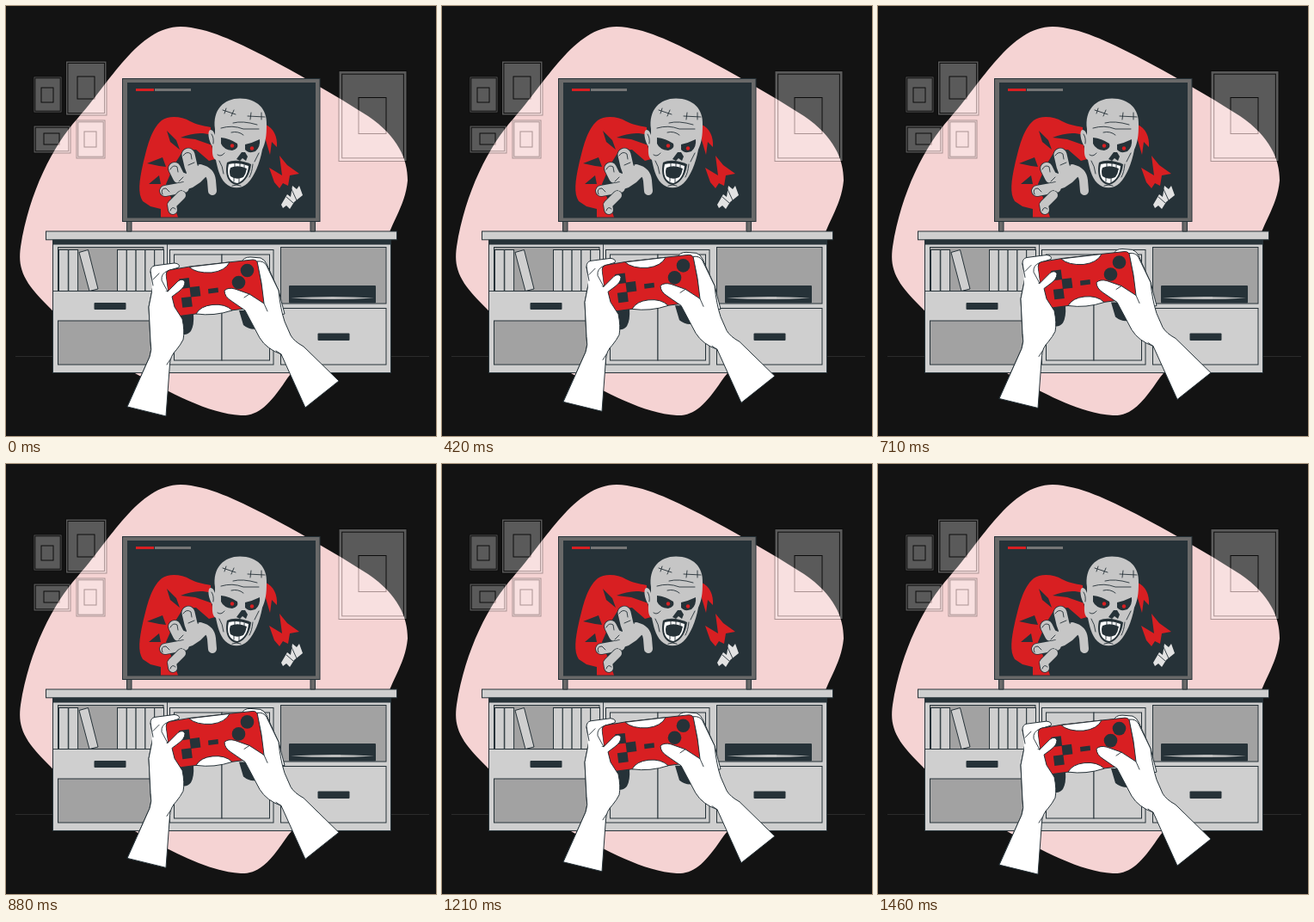
An HTML page that plays this animation: 500x500 px, repeating every 1500 ms.

```html
<!DOCTYPE html>
<html lang="en">
<head>
<meta charset="utf-8">
<title>Game night</title>
<style>
  html, body { margin: 0; width: 100%; height: 100%; overflow: hidden; background: #131313; }
  svg { display: block; width: 100vw; height: 100vh; }
  .ink { fill: #263238; }
  .red { fill: #d81f22; }
  .skin { fill: #c6c6c6; }
  .line { fill: none; stroke: #263238; stroke-width: .9; stroke-linecap: round; stroke-linejoin: round; }
  .wood { fill: #cfcfcf; stroke: #263238; }
  .hole { fill: #a2a2a2; stroke: #263238; }
  .hand { fill: #fff; stroke: #263238; stroke-linejoin: round; }
  .pic { fill: #fff; stroke: #000; stroke-width: 1; }
</style>
</head>
<body>
<svg viewBox="0 0 500 500">
  <rect width="500" height="500" fill="#131313"/>
  <path fill="#f5d3d3" d="M203 24C235 25 268 42 300 58C338 78 382 103 421 128C456 152 467 178 467 203C464 235 447 250 435 295C400 380 352 398 325 436C306 464 293 477 273 476C235 474 190 449 150 427C110 410 75 376 45 345C18 318 14 302 17 280C27 216 55 162 83 131C120 90 154 24 203 24Z"/>
  <path d="M11 407.500H54M447 407.500H492" stroke="#2c2c2c"/>
  <g id="pics" opacity=".3"></g>

  <g id="cabinet">
    <rect class="wood" x="54.500" y="277" width="393" height="149.500"/>
    <rect class="ink" x="54" y="271" width="394" height="6"/>
    <rect class="wood" x="46.500" y="262" width="408" height="9.800"/>
    <rect class="hole" x="60.500" y="280.500" width="122.500" height="51"/>
    <rect class="hole" x="60.500" y="366" width="122.500" height="51"/>
    <path class="line" d="M54.500 331.500H187M187.500 277V417"/>
    <rect class="ink" x="102.500" y="345" width="37" height="8" rx="1"/>
    <rect class="wood" x="190.500" y="283.500" width="120.500" height="133.500"/>
    <rect class="wood" x="195.500" y="289" width="55.500" height="123"/>
    <rect class="wood" x="251" y="289" width="55.500" height="123"/>
    <rect class="hole" x="319.500" y="280.500" width="122.500" height="65.500"/>
    <rect class="ink" x="329" y="325" width="101" height="20.500" rx="1"/>
    <path fill="#bdbdbd" d="M331 339.500Q380 336.500 428 339.500Q380 342.500 331 339.500Z"/>
    <rect class="wood" x="319.500" y="351.500" width="122.500" height="65.500"/>
    <rect class="ink" x="362.500" y="380.500" width="37" height="8.500" rx="1"/>
    <g id="books"></g>
    <path class="wood" d="M85 286.500L95.500 283.500L107 329L97 331.500Z"/>
  </g>

  <g id="tv">
    <path fill="#696969" stroke="#263238" d="M140.500 250H146V262H140.500ZM354 250H359.500V262H354Z"/>
    <rect x="135.500" y="84.500" width="229.500" height="166" fill="#696969" stroke="#263238"/>
    <rect class="ink" x="141" y="89" width="219" height="157.500"/>
    <path d="M173 97.500H215" stroke="#757575" stroke-width="3"/>
    <path d="M151 97.500H172" stroke="#d81f22" stroke-width="3"/>
  </g>

  <g id="monster">
    <path class="red" d="M238 141C229 139 221 138 214 134C204 128 189 127 181 133C168 144 164 165 159 185C155 203 153 218 159 227L168 233L180 236V245.500H200L193 226L186 207L196 184L206 168L221 167L236 180L243 178L238 158Z"/>
    <path class="ink" d="M238 150C226 146 214 149 203 153L220 155L240 162ZM187 145L191 158L202 167L198 156ZM182 176L164 183L178 186L186 187ZM178 197L166 207L180 207Z"/>
    <path class="red" d="M302 138C311 142 316 152 315 164L309 158L307 173L302 156ZM318 174L327 185L341 195L330 197L328 209L322 206L318 212L312 205L306 188L321 197Z"/>
    <path fill="#e2e2e2" d="M320 231L327 219L331 222L333 209L338 213L341 209L345 220L335 228L330 236L326 232L322 235Z"/>
    <path class="line" d="M326 222L334 229M332 213L338 226"/>
    <g id="claw"></g>

    <path class="skin" d="M243 143C240 121 253 107.500 272 107.500C292 107.500 304 120 303 138C303 151 302 158 298 167C295 183 289 198 281 206C274 213 262 213 255 206C248 199 246 188 244 179C239 176 240 168 240 163C235 156 234 144 238 144Q241 144 243 150Z"/>
    <path class="line" d="M252 121L267 126M256 119L254 125M265 121L262 128M281 128L301 129M285 124L284 132M297 124L297 132M264 136Q275 133 292 138M250 142Q263 138 276 143L294 143M262 147Q270 145 276 150M239 149Q242 153 241 160M246 173Q250 176 254 171M294 171L289 181M248 180Q252 186 253 195M287 184Q286 194 283 199M263 209Q268 207 273 209"/>
    <path class="ink" d="M250 153Q260 154 269 160Q271 166 263 168Q253 167 250 160ZM278 161Q287 159 295 155Q296 164 290 169Q282 172 278 167ZM274 170L268 178L272 180L275 177L279 180L281 175L278 170Z"/>
    <circle class="red" cx="263" cy="162.500" r="2.200"/>
    <circle class="red" cx="286" cy="165.500" r="2.200"/>
    <path class="ink" d="M257 182C265 178 276 180 285 184C284 194 279 205 269 208C258 207 254 196 257 182Z"/>
    <path fill="#fff" d="M259 184Q270 181 282 186C281 196 277 203 269 206C260 205 256 196 259 184Z"/>
    <path class="ink" d="M261 188Q270 184 280 189Q279 195 276 199Q268 203 261 198Q259 193 261 188Z"/>
    <path class="line" d="M266 183V187M272 183V188M277 185V188M265 200V204M271 200V205"/>
  </g>

  <g id="player">
    <path class="ink" d="M203 360L218 358Q219 371 215 378Q210 384 203 381ZM271 354H298L300 372Q287 380 276 371Z"/>
    <path class="hand" d="M274 298Q276 292 284 292L296 293Q301 295 303 300L317 331L324 358L306 362L290 330Z"/>
    <path class="hand" d="M141 466L167 408Q170 400 168 390L166 350L171 325L168 309Q168 303 173 302L196 299Q203 300 201 304L188 308L194 350Z"/>
    <path class="red" stroke="#263238" d="M190 307L214 303L259 298L287 295Q292 295 293 300L300 340Q300 349 293 350L262 354L221 358L198 361Q192 361 191 354L186 313Q186 308 190 307Z"/>
    <path fill="#fff" stroke="#263238" d="M213 303.500L260 298Q255 308 239 310Q221 311 213 303.500ZM221 358Q226 349 240 347.500Q255 346 263 354Q242 361 221 358Z"/>
    <g class="ink">
      <circle cx="280.500" cy="307.500" r="7.800"/>
      <circle cx="270.500" cy="321.500" r="7.800"/>
      <path d="M235 329L246.500 327.500L247 333L235.500 334.500Z"/>
      <g id="pad" transform="translate(209 333.500) rotate(-7)"></g>
    </g>
    <path class="hand" d="M141 466L167 408Q170 400 168 390L166 350L171 325L188 332L200 320Q206 316 208 321Q208 327 201 332L193 338L196 350L205 364Q208 378 206 388Q203 394 198 400Q191 407 190.500 416L186 477Z"/>
    <path fill="#fff" d="M169 310L185.500 312L188 331L170 335Z"/>
    <path class="line" d="M168 309L171 325M188 308Q180 311 181 319L188 332M171 318L178 311M191 411L187 417"/>
    <path class="hand" d="M292 297Q300 296 303 302L317 331Q319 352 324 367L331 383Q335 390 346 396L387 436L348 467L320 405Q303 399 295 386L278 354L262 343Q254 338 254 331Q258 327 266 329L283 335L300 346L297 322Z"/>
    <path class="line" d="M283 335L277 339M300 346L304 355M320 405L314 401"/>
  </g>
</svg>
<script>
const $ = id => document.getElementById(id);
const rect = (x, y, w, h, cls) =>
  `<rect class="${cls}" x="${x}" y="${y}" width="${w}" height="${h}"/>`;

// Each picture: outer box, then the small box in its middle.
const pictures = [
  [32, 82, 33, 42, 41, 95, 14, 17],
  [69.5, 64, 47.5, 63, 83, 82, 20, 26],
  [32, 139, 43, 32, 44, 148, 18, 13],
  [82, 133, 33, 44, 91, 146, 14, 18],
  [387, 75.5, 79, 105, 410, 106.5, 32, 42]
];
$("pics").innerHTML = pictures.map(([x, y, w, h, ...inner]) => {
  const rim = w * .04 + .5;
  return rect(x, y, w, h, "pic") + rect(x + rim, y + rim, w - 2 * rim, h - 2 * rim, "pic") + rect(...inner, "pic");
}).join("");

const book = x => rect(x, 283.5, 10.8, 48, "wood");
$("books").innerHTML = [61.5, 72.8, 129.5, 140.3, 151.1, 161.9, 172.7].map(book).join("");

$("pad").innerHTML = [[0, -11], [11, 0], [0, 11]]
  .map(([x, y]) => rect(x - 5.8, y - 5.8, 11.6, 11.6, "ink")).join("");

const limb = (d, w) => [["#263238", w + 1.6], ["#c6c6c6", w]].map(([c, s]) =>
  `<path d="${d}" fill="none" stroke="${c}" stroke-width="${s}" stroke-linecap="round" stroke-linejoin="round"/>`
).join("");
$("claw").innerHTML =
  limb("M226 189Q238 192 239 203L240 215", 10) +
  limb("M212 173L215 186L219 197", 15) +
  limb("M196 189L201 199L210 203", 14) +
  limb("M185 215L196 213L207 211", 12) +
  limb("M194 237L193 231L204 220", 10) +
  '<path class="skin" d="M213 186L229 186L234 197L226 205L217 211L205 215L207 202Z"/>' +
  '<path class="line" d="M206 174Q210 168 215 172L216 178M191 190Q194 184 199 187L200 193M182 219Q179 212 186 212L190 216M191 238Q193 232 197 236M212 185L219 182M201 204L206 199"/>';

const LOOP = 1500, LIFT = 10, PHASE = 25;
const player = $("player");

function draw(ms) {
  const u = ((ms + PHASE) % LOOP) / LOOP;
  const up = LIFT * (1 - Math.abs(2 * u - 1));
  player.setAttribute("transform", `translate(0 ${(0.3 - up).toFixed(3)})`);
}

const start = performance.now();
function tick() {
  draw(performance.now() - start);
  requestAnimationFrame(tick);
}
tick();
</script>
</body>
</html>
```
